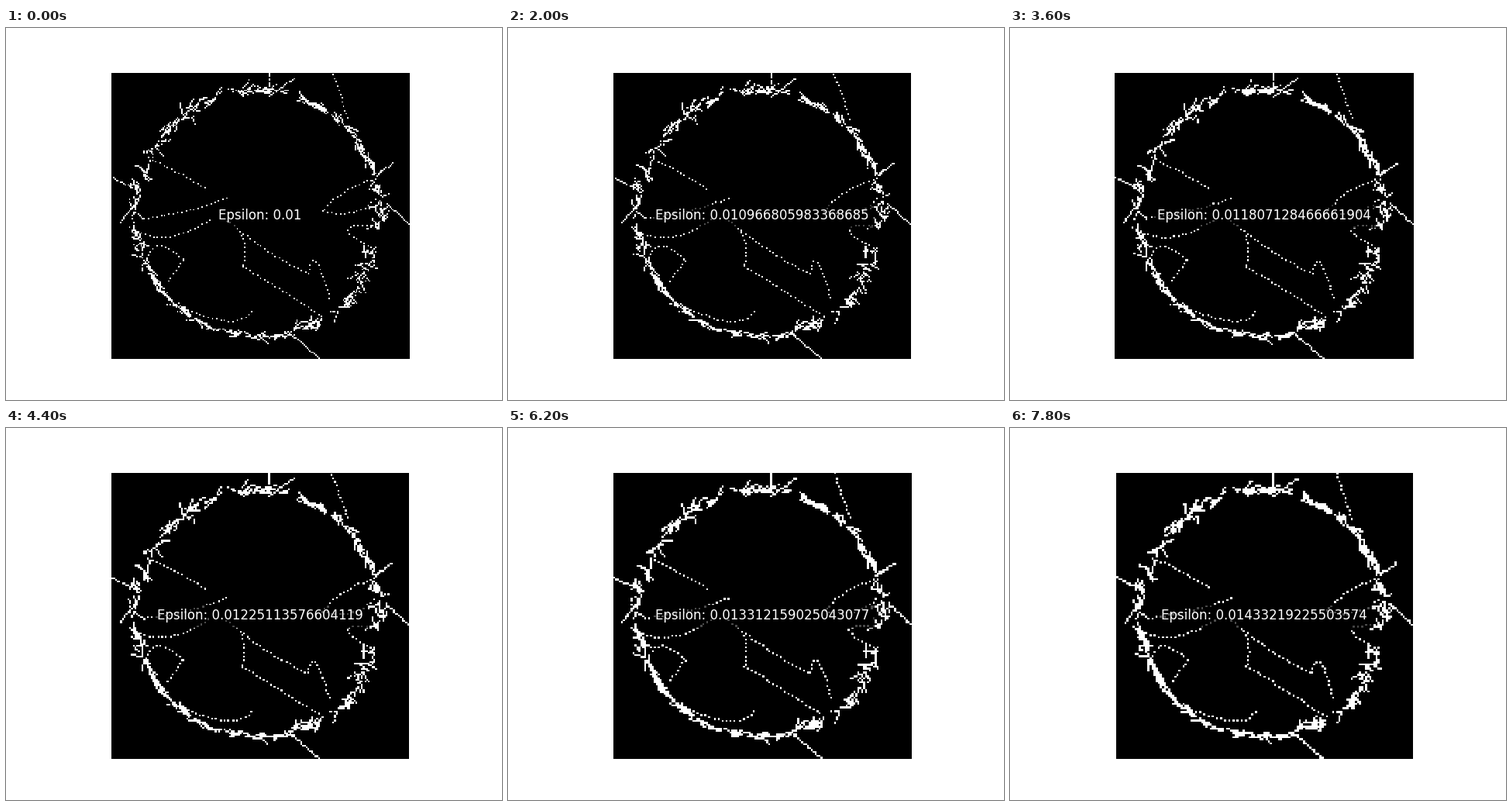
These frames come from a looping animation (640 px wide and 480 px high, 8000 ms). A matplotlib script:

```python
import numpy as np
import matplotlib.pyplot as plt
from matplotlib.animation import FuncAnimation

FRAMES, INTERVAL = 40, 200
EPSILONS = np.logspace(-2, 0, 500)

# Extent of the point set in data units, and its place on the stage in pixels.
WIDTH, HEIGHT = 2.05, 1.9747
TOP, BOTTOM, MIDDLE = 57.6, 427.2, 328
HALF = (BOTTOM - TOP) * WIDTH / HEIGHT / 2
RANGE = [[TOP, BOTTOM], [MIDDLE - HALF, MIDDLE + HALF]]

CENTER, RADIUS = np.array([325, 240]), 158
GAPS = np.array([11, 54, 104, 176, 205, 254, 284])  # degrees, clockwise from right
STROKES = 185

# Threads inside the ring: start, control point, end
THREADS = [
    (184, 168, 222, 186, 257, 208), (178, 246, 235, 240, 285, 220),
    (160, 258, 205, 288, 264, 247), (285, 249, 340, 295, 390, 317),
    (390, 317, 396, 272, 417, 350), (302, 263, 312, 285, 305, 308),
    (305, 308, 350, 335, 411, 375), (225, 359, 300, 395, 318, 365),
    (180, 304, 190, 262, 229, 300), (229, 300, 218, 315, 208, 329),
    (476, 195, 430, 208, 409, 237), (409, 237, 455, 248, 478, 218),
    (476, 256, 405, 252, 474, 285), (421, 60, 431, 88, 441, 118),
]

# Straight rays leaving the ring: start, end
RAYS = [
    (340, 58, 339, 85), (371, 66, 338, 90), (136, 193, 170, 210),
    (366, 394, 404, 427), (490, 227, 521, 256), (498, 175, 476, 192),
    (148, 251, 166, 228),
]


def dotted(vertices, step):
    """Evenly spaced points along a polyline."""
    v = np.array(vertices, float)
    dist = np.r_[0, np.cumsum(np.hypot(*np.diff(v, axis=0).T))]
    s = np.arange(0, dist[-1] + 0.01, step)
    return np.c_[np.interp(s, dist, v[:, 0]), np.interp(s, dist, v[:, 1])]


def bezier(start, control, end):
    t = np.linspace(0, 1, 40)[:, None]
    return (1 - t) ** 2 * start + 2 * t * (1 - t) * control + t ** 2 * end


def polar(angle, r):
    return r * np.array([np.cos(angle), np.sin(angle)])


def barb(rng, degrees):
    """A narrow V lying roughly along the ring."""
    a = np.radians(degrees)
    rough = 0.5 + 0.3 * np.cos(2 * a - 1)
    apex = CENTER + polar(a, RADIUS + rng.normal(0, 5 * rough))
    side = rng.choice([-1, 1]) * np.pi / 2
    ends = [apex + polar(a + side + rng.normal(0, rough), rng.uniform(5, 17))
            for _ in range(2)]
    return dotted([ends[0], apex, ends[1]], rng.uniform(1.6, 3.2))


def make_points():
    rng = np.random.default_rng(12)
    parts = [dotted(bezier(*np.reshape(t, (3, 2))), 5.5) for t in THREADS]
    parts += [dotted(np.reshape(r, (2, 2)), 2.6) for r in RAYS]
    angles = np.arange(STROKES) * 360 / STROKES + rng.uniform(-1, 1, STROKES)
    parts += [barb(rng, a) for a in angles if np.abs(a - GAPS).min() > 3]
    return np.vstack(parts)


POINTS = make_points()


def boxes(eps):
    """Occupied cells of a grid with cell size eps."""
    bins = [round(HEIGHT / eps), round(WIDTH / eps)]
    hits, _, _ = np.histogram2d(POINTS[:, 1], POINTS[:, 0], bins=bins, range=RANGE)
    return (hits > 0).astype(float)


fig, ax = plt.subplots(figsize=(6.4, 4.8), dpi=100)
fig.subplots_adjust(left=0.125, right=0.9, bottom=0.11, top=0.88)
ax.axis("off")
image = ax.imshow(boxes(EPSILONS[0]), cmap="gray", vmin=0, vmax=1,
                  interpolation="nearest")
label = ax.text(0.5, 0.5, "", transform=ax.transAxes, color="white", fontsize=12,
                ha="center", va="center",
                bbox=dict(facecolor="black", edgecolor="black", alpha=0.7))


def update(n):
    eps = EPSILONS[n]
    grid = boxes(eps)
    rows, cols = grid.shape
    image.set_data(grid)
    image.set_extent((0, cols, rows, 0))
    ax.set_xlim(0, cols)
    ax.set_ylim(rows, 0)
    label.set_text(f"Epsilon: {eps}")
    return image, label


anim = FuncAnimation(fig, update, frames=FRAMES, interval=INTERVAL,
                     repeat=True, repeat_delay=0)
plt.show()
```
